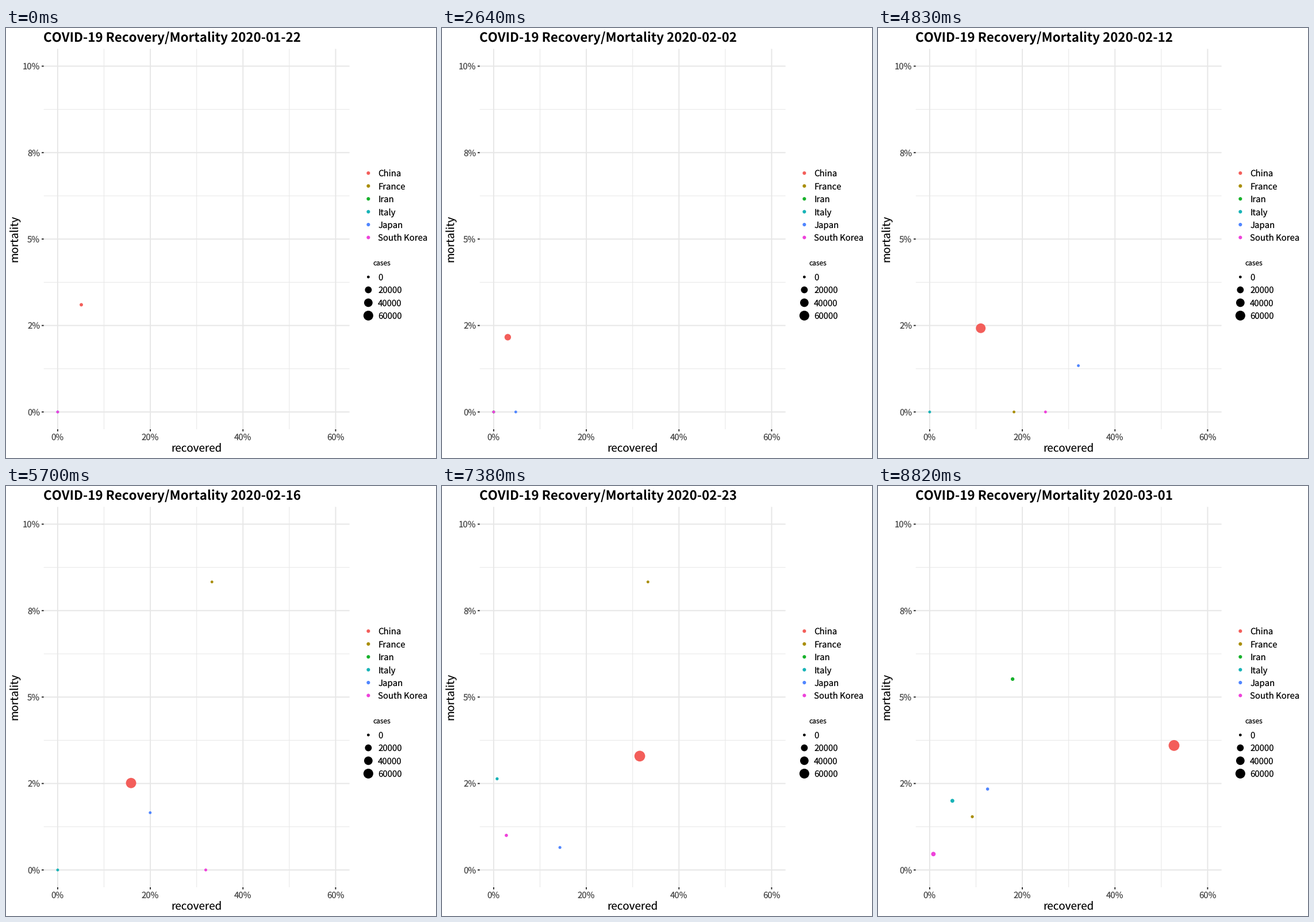
These frames come from a looping animation (748x748 px, 9 s). A matplotlib script:

```python
import numpy as np
import matplotlib.pyplot as plt
from matplotlib.animation import FuncAnimation

SIZE, DPI = 748, 88
PT = 72 / DPI                      # points per pixel
FRAMES, LAST, DAYS = 300, 294, 39  # the last state is held to the end
START = np.datetime64("2020-01-22")
TOP_CASES = 8e4

plt.rcParams["font.family"] = ["Noto Sans CJK JP", "DejaVu Sans"]
plt.rcParams["text.hinting"] = "none"


def px(recovered):
    return 89.9 + 8.058 * recovered


def py(mortality):
    return 667.9 - 60.15 * mortality


def radius(share):
    return 2.37 + 7.1 * np.sqrt(share)


def outbreak(first, last):
    """Growth of cases that speeds up over the life u of a path."""
    return lambda u: radius(first * (last / first) ** u ** 2 / TOP_CASES)


def epidemic(u):
    """S-shaped growth that levels off at the top."""
    return 2.37 + 7.1 / (1 + np.exp((12.4 - DAYS * u) / 5.1))


class Path:
    """A dot moving between (day, recovered %, mortality %) points."""

    def __init__(self, color, size, *points):
        self.color, self.size = color, size
        days, rec, mort = np.array([(*p, 0)[:3] for p in points]).T
        self.keys = np.round(days * LAST / DAYS)
        self.x, self.y = px(rec), py(mort)

    def at(self, i):
        a, b = self.keys[[0, -1]]
        if not a <= i <= b:
            return -50, -50, 0
        return (np.interp(i, self.keys, self.x), np.interp(i, self.keys, self.y),
                self.size((i - a) / (b - a)))


NAMES = ["China", "France", "Iran", "Italy", "Japan", "South Korea"]
COLORS = ["#F35E5A", "#A98E0C", "#17B12B", "#17B3B7", "#5086FF", "#EE42DA"]
RED, OLIVE, GREEN, TEAL, BLUE, PINK = COLORS

# France leaves the axis range for a while, so it has two paths.
PATHS = [
    Path(RED, epidemic, (0, 5.1, 3.1), (3, 2.8, 3), (5, 2, 2.86), (7, 2, 2.2),
         (12, 3.1, 2.16), (15, 4.8, 2.07), (21, 11.4, 2.5), (22, 10.4, 2.29),
         (26, 17.2, 2.57), (32, 30.1, 3.18), (33, 32.4, 3.36), (39, 52.75, 3.6)),
    Path(OLIVE, outbreak(2, 12), (2, 0), (20, 0), (21, 18.2), (23, 18.2),
         (24, 33.3, 8.33), (33, 33.3, 8.33)),
    Path(OLIVE, outbreak(38, 130), (36, 28.9, 5.3), (37, 19.3, 3.5), (38, 12, 2),
         (39, 9.2, 1.54)),
    Path(GREEN, outbreak(388, 978), (37, 18.8, 8.76), (38, 20.7, 7.25),
         (39, 17.9, 5.52)),
    Path(TEAL, outbreak(2, 1694), (9, 0), (29, 0), (30, 0, 5), (32, 1.3, 1.93),
         (33, 0.4, 3.06), (35, 0.7, 2.65), (36, 6.9, 2.6), (39, 4.9, 2)),
    Path(BLUE, outbreak(2, 256), (0, 0), (3, 0), (4, 25), (5, 25), (6, 14.3),
         (10, 5), (18, 3.9), (20, 34.6), (21, 32.1), (22, 32.1, 3.57),
         (23, 31, 3.45), (25, 20.3, 1.7), (27, 17.6, 1.35), (30, 21, 0.95),
         (32, 15, 0.68), (34, 12.9, 0.59), (37, 9.7, 1.8), (39, 12.5, 2.34)),
    Path(PINK, outbreak(1, 3736), (0, 0), (15, 0), (16, 4.2), (18, 12), (20, 10.7),
         (21, 25), (23, 25), (25, 31), (27, 38.7), (28, 38.7), (29, 15.4, 0.96),
         (31, 3.7, 0.46), (32, 3, 1), (34, 2.2, 1), (37, 0.9, 0.55),
         (39, 0.8, 0.46)),
]

fig = plt.figure(figsize=(SIZE / DPI, SIZE / DPI), dpi=DPI, facecolor="white")
ax = fig.add_axes([0, 0, 1, 1])
ax.set(xlim=(0, SIZE), ylim=(SIZE, 0))
ax.axis("off")


def line(xs, ys, color, width):
    ax.plot(xs, ys, color=color, lw=width * PT, solid_capstyle="butt",
            snap=False, zorder=1)


def label(x, y, s, size=14.95, color="black", **kw):
    return ax.text(x, y, s, fontsize=size * PT, color=color, va="baseline", **kw)


def areas(r):
    return (2 * np.asarray(r) * PT) ** 2


def dots(xs, ys, rs, colors):
    return ax.scatter(xs, ys, s=areas(rs), c=colors, linewidths=0, zorder=3)


GRID, TICK, AXIS_TEXT = "#E7E7E7", "#2A2A2A", "#434343"
LEFT, RIGHT, TOP, BOTTOM = px(-3), px(63), py(10.5), py(-0.5)

for v in (10, 30, 50):
    line([px(v)] * 2, [TOP, BOTTOM], GRID, 1)
for v in (1.25, 3.75, 6.25, 8.75):
    line([LEFT, RIGHT], [py(v)] * 2, GRID, 1)
for v in (0, 20, 40, 60):
    line([px(v)] * 2, [TOP, BOTTOM], GRID, 2)
    line([px(v)] * 2, [BOTTOM, BOTTOM + 3.7], TICK, 1.9)
    label(px(v), 716.4, f"{v}%", color=AXIS_TEXT, ha="center")
for v in (0, 2.5, 5, 7.5, 10):
    line([LEFT, RIGHT], [py(v)] * 2, GRID, 2)
    line([LEFT - 3.7, LEFT], [py(v)] * 2, TICK, 1.9)
    label(59.3, py(v) + 5.6, f"{round(v)}%", color=AXIS_TEXT, ha="right")

label((LEFT + RIGHT) / 2, 736.8, "recovered", 18.8, ha="center")
label(20.5, (TOP + BOTTOM) / 2 - 1.2, "mortality", 18.8, ha="center", rotation=90,
      rotation_mode="anchor")
title = label(LEFT - 0.4, 23.7, "", 22.33, weight="bold")

rows = 252.4 + 22.4 * np.arange(6)
dots([630.3] * 6, rows, [3.05] * 6, COLORS)
for y, name in zip(rows, NAMES):
    label(647.2, y + 5.7, name)

label(638.8, 414.2, "cases", 12)
steps = np.arange(0, 80000, 20000)
rows = 433.1 + 22.4 * np.arange(4)
dots([630.3] * 4, rows, radius(steps / TOP_CASES), "black")
for y, n in zip(rows, steps):
    label(647.2, y + 5.7, str(n))

hidden = np.zeros(len(PATHS))
points = dots(hidden, hidden, hidden, [p.color for p in PATHS])


def draw(frame):
    i = min(frame, LAST)
    x, y, r = np.array([p.at(i) for p in PATHS]).T
    points.set_offsets(np.column_stack([x, y]))
    points.set_sizes(areas(r))
    title.set_text(f"COVID-19 Recovery/Mortality {START + DAYS * i // LAST}")
    return points, title


anim = FuncAnimation(fig, draw, frames=FRAMES, interval=30, repeat=True,
                     repeat_delay=0, blit=False)
plt.show()
```
